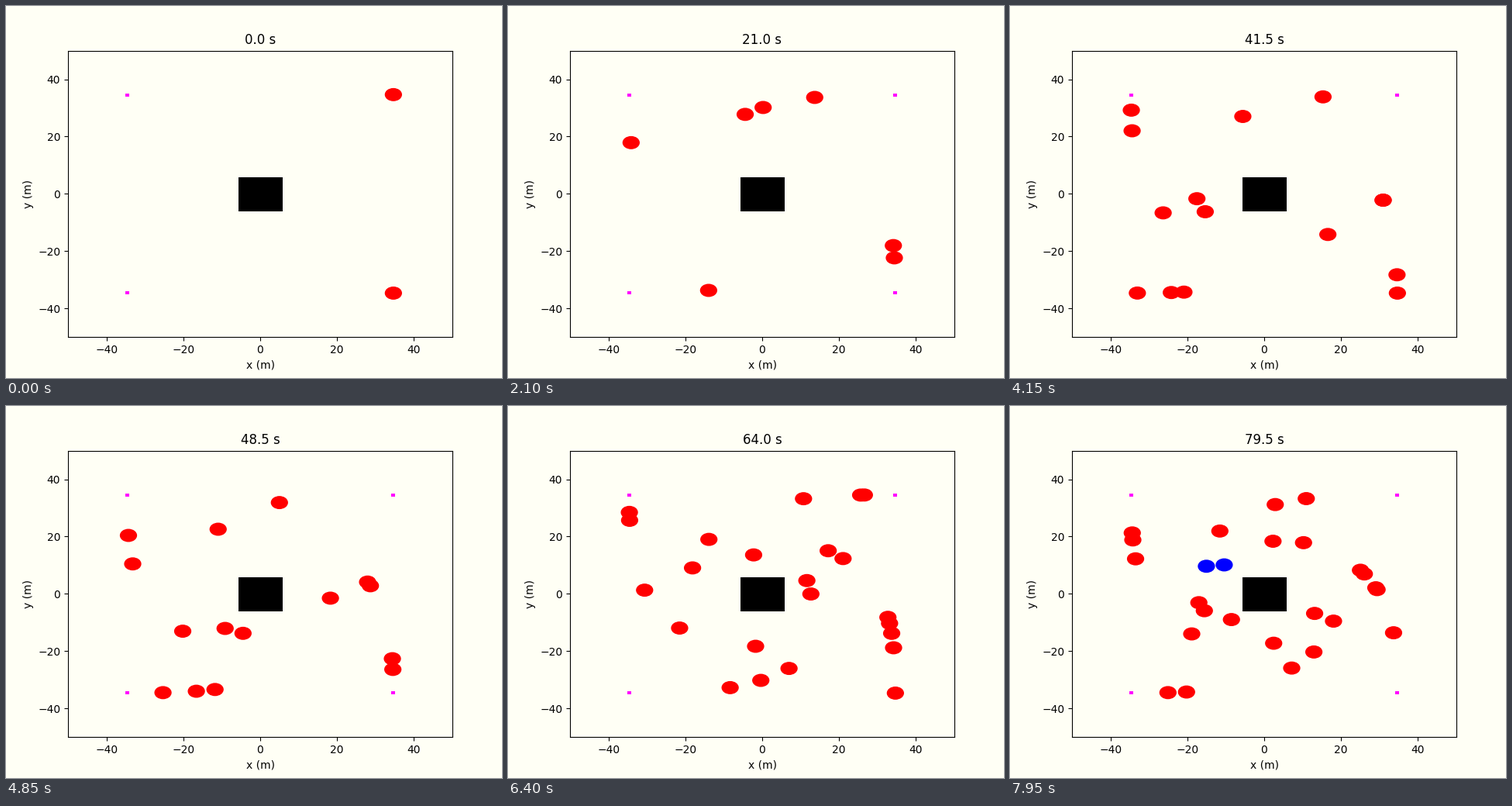
Animation, 640 px wide and 480 px high, one loop 8000 ms. Source, as a matplotlib script:

```python
import numpy as np
import matplotlib.pyplot as plt
from matplotlib.animation import FuncAnimation
from matplotlib.patches import Circle, Rectangle

FRAMES, STEP = 160, 0.5     # simulated seconds per frame
DONE = 430                  # degrees walked before a walker turns blue and leaves
PAPER = "#fffff5"

plt.rcParams["text.kerning_factor"] = 6

# Walkers by starting corner: (start time, speed)
starts = {
    45: [(0, 1.0), (0.3, 1.94), (3.1, 1.95), (28.6, 1.5), (49.4, 1.64),
         (54.5, 0.95), (58.8, 1.55)],
    135: [(7.8, 1.27), (33.9, 1.66), (37.2, 1.26), (53.7, 0.87), (54, 0.62),
          (69.6, 1.35)],
    225: [(9.8, 1.85), (31, 1.31), (31.8, 1.08), (40, 1.1), (68.4, 1.3),
          (71.5, 1.2)],
    315: [(0, 0.79), (8.7, 1.0), (33.5, 0.8), (41.5, 1.18), (49.5, 1.44),
          (52.7, 1.4), (64, 1.36)],
}


def radius(turn):
    """Spiral from a corner in to the block, then out again once done."""
    spiral = 12 + 31 * np.exp(-turn / 82) + 6 * np.exp(-turn / 12)
    return spiral + 0.0055 * np.maximum(turn - DONE, 0) ** 2


# Distance walked along the spiral, so that each walker keeps a steady speed
turns = np.linspace(0, 500, 2001)
r = radius(turns)
steps = np.hypot(np.diff(r), r[1:] * np.radians(np.diff(turns)))
walked = np.concatenate(([0], np.cumsum(steps)))

fig, ax = plt.subplots(figsize=(6.4, 4.8), dpi=100, facecolor=PAPER)
ax.set_facecolor(PAPER)
ax.set(xlim=(-50, 50), ylim=(-50, 50), xlabel="x (m)", ylabel="y (m)")
title = ax.set_title("0.0 s")

ax.add_patch(Rectangle((-5.7, -6), 11.5, 11.8, color="black", lw=0))
for x in (-35, 34):
    for y in (-35, 34):
        ax.add_patch(Rectangle((x, y), 1, 1, color="magenta", lw=0))

walkers = []
for corner, group in starts.items():
    for start, speed in group:
        dot = ax.add_patch(Circle((0, 0), 2.1, lw=1, zorder=3, visible=False))
        walkers.append((dot, corner, start, speed))


def draw(k):
    t = k * STEP
    title.set_text(f"{t:.1f} s")
    for dot, corner, start, speed in walkers:
        turn = np.interp(speed * (t - start), walked, turns)
        angle = np.radians(corner + turn)
        dot.set_center(radius(turn) * np.array([np.cos(angle), np.sin(angle)]))
        dot.set_color("blue" if turn > DONE else "red")
        dot.set_visible(t >= start)
    return [title] + [dot for dot, *_ in walkers]


anim = FuncAnimation(fig, draw, frames=FRAMES, interval=50,
                     init_func=lambda: draw(0), repeat=True)
plt.show()
```
